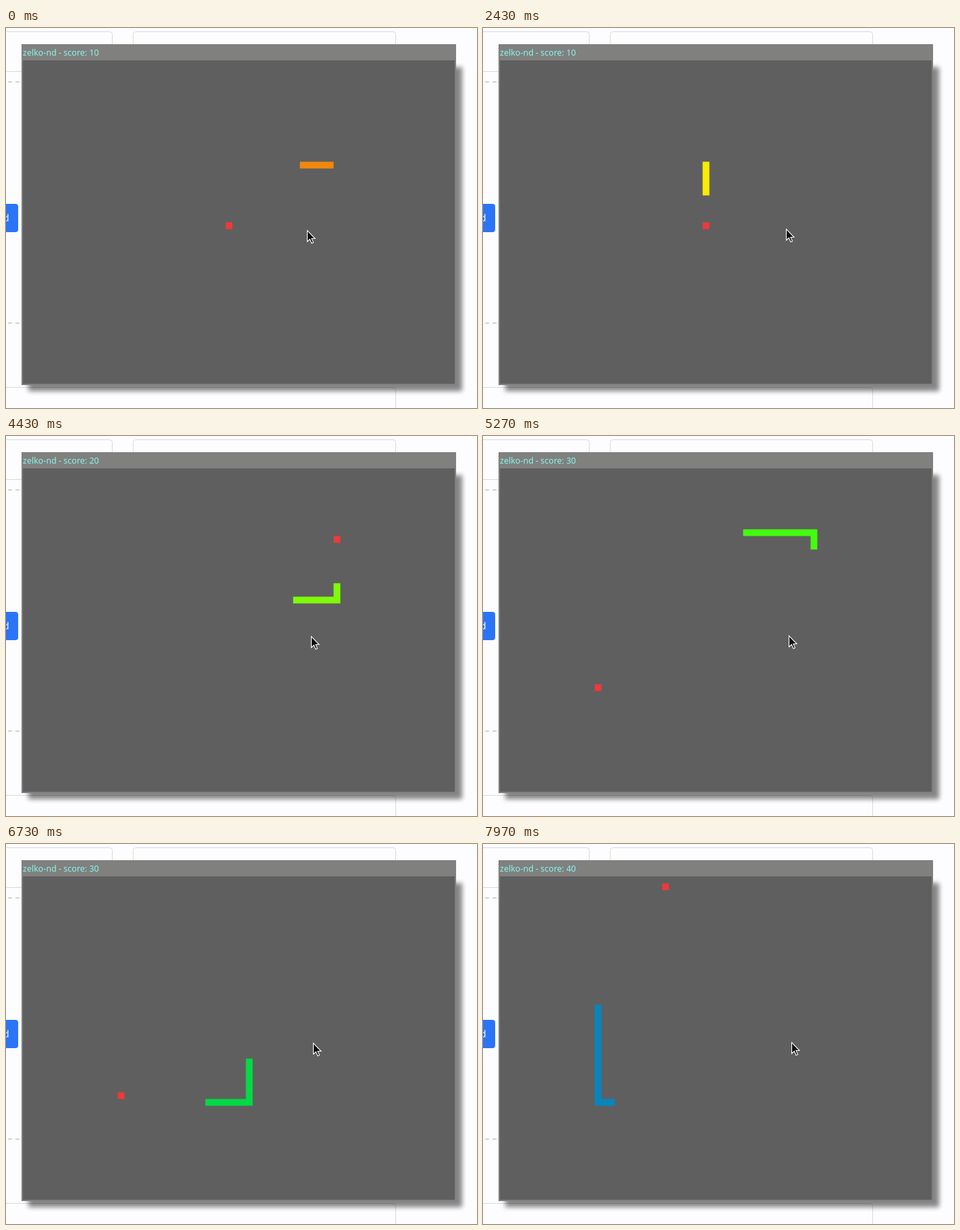
Write an HTML page that moves like this. It is 698x564 px and loops after 8 s.

```html
<!DOCTYPE html>
<html lang="en">
<head>
<meta charset="utf-8">
<title>Snake game</title>
<style>
  html, body { margin: 0; width: 100%; height: 100%; overflow: hidden; background: #fdfcfe; }
  svg { display: block; width: 698px; height: 564px; }
  text { font-family: "Noto Sans", "Open Sans", sans-serif; white-space: pre; }
</style>
</head>
<body>
<svg viewBox="0 0 698 564">
  <defs>
    <filter id="blur" x="-5%" y="-5%" width="110%" height="110%">
      <feGaussianBlur stdDeviation="3.8"/>
    </filter>
  </defs>

  <!-- page behind the window -->
  <rect width="698" height="564" fill="#fdfcfe"/>
  <g fill="none" stroke="#d9d8dc">
    <path d="M-5 5.5H153.5a4 4 0 0 1 4 4V64.5H-5"/>
    <rect x="188.5" y="5.5" width="389" height="300" rx="4"/>
    <path d="M-5 533.5H573.5a4 4 0 0 1 4 4V570"/>
  </g>
  <path d="M3 80H24M3 438H24" stroke="#d3d2d6" stroke-width="2" stroke-dasharray="6 5"/>
  <rect x="-20" y="261" width="38" height="42" rx="4" fill="#2b74f7"/>
  <text x="4.5" y="287" font-size="14" fill="#fff" text-anchor="end">d</text>

  <!-- game window -->
  <rect x="33" y="58" width="643" height="481" opacity=".47" filter="url(#blur)"/>
  <rect x="23" y="24" width="644" height="506" fill="#80817f"/>
  <rect x="25" y="48" width="640" height="480" fill="#5f5f5f"/>
  <text id="title" x="25" y="41" font-size="12.5" fill="#86f5ea"></text>
  <path id="food" fill="#ee3939"/>
  <path id="snake"/>
  <path id="cursor" d="M.5 .5V17L4.3 13.5L7 19.5L9.5 18.4L6.9 12.5H12Z"
        fill="#0a0a0a" stroke="#fff" stroke-width="1.1"/>
</svg>
<script>
const LOOP = 8000, STEP = 45.47, PHASE = 1.7;
const COLS = 64, CELL = 10, LEFT = 25.5, TOP = 48.5;
const START_LEN = 5, GROWTH = 4;

const DIRS = { R: [1, 0], L: [-1, 0], D: [0, 1], U: [0, -1] };
const ROUTE = "R49 D13 L4 U9 R20 U10 L13 D24 L19 U16";
const FOODS = [[30, 24], [46, 10], [14, 32], [24, 1]];

// Orange, yellow, green, blue
const COLORS = [
  { at: 0, rgb: [240, 136, 12] },
  { at: 2700, rgb: [250, 245, 2] },
  { at: 6200, rgb: [0, 255, 18] },
  { at: LOOP, rgb: [8, 131, 192] }
];

const el = id => document.getElementById(id);
const title = el("title"), food = el("food"), snake = el("snake"), cursor = el("cursor");

const square = ([x, y]) =>
  `M${LEFT + x * CELL} ${TOP + y * CELL}h${CELL}v${CELL}h-${CELL}z`;

// Plays the game once and keeps the state after every step
function play() {
  let body = Array.from({ length: START_LEN }, (_, i) => [45 - i, 15]);
  let eaten = 0, growth = 0;
  const states = [{ body, eaten }];
  for (const leg of ROUTE.split(" ")) {
    const [dx, dy] = DIRS[leg[0]];
    for (let i = +leg.slice(1); i > 0; i--) {
      const [x, y] = body[0];
      const head = [(x + dx + COLS) % COLS, y + dy];
      body = [head, ...body];
      if (growth > 0) growth--;
      else body.pop();
      if (String(head) === String(FOODS[eaten])) {
        eaten++;
        growth += GROWTH;
      }
      states.push({ body, eaten });
    }
  }
  return states;
}

function colorAt(t) {
  const i = COLORS.findIndex(c => c.at > t);
  const a = COLORS[i - 1], b = COLORS[i];
  const k = (t - a.at) / (b.at - a.at);
  return `rgb(${a.rgb.map((v, c) => Math.round(v + (b.rgb[c] - v) * k))})`;
}

const states = play();

function draw(t) {
  const { body, eaten } = states[Math.floor((t + PHASE) / STEP)];
  title.textContent = `zelko-nd - score: ${10 + eaten * 10}`;
  food.setAttribute("d", square(FOODS[eaten]));
  snake.setAttribute("d", body.map(square).join(""));
  snake.setAttribute("fill", colorAt(t));

  const x = Math.round(446 + t * 0.0014), y = Math.round(300.4 - t * 0.0008);
  cursor.setAttribute("transform", `translate(${x} ${y})`);
}

const start = performance.now();
function tick() {
  draw((performance.now() - start) % LOOP);
  requestAnimationFrame(tick);
}
tick();
</script>
</body>
</html>
```
